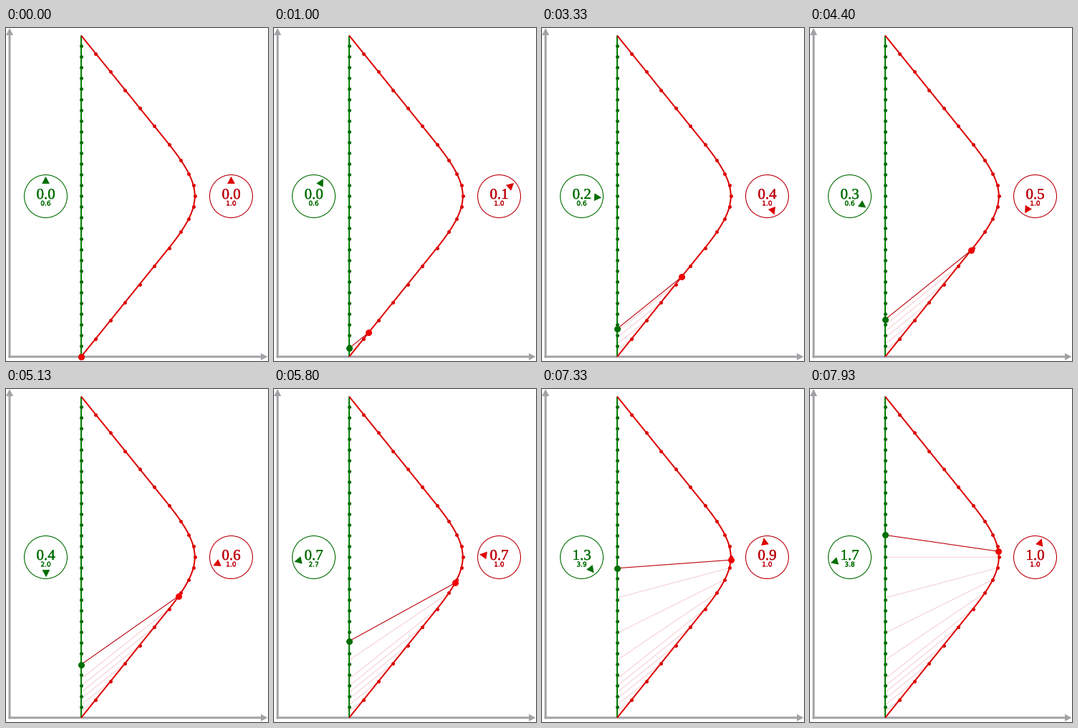
A matplotlib script for the animation above (8000 ms loop, 366 by 466 pixels).

```python
import numpy as np
import matplotlib.pyplot as plt
from matplotlib.animation import FuncAnimation
from matplotlib.patches import Circle, Polygon
from matplotlib.patheffects import withStroke

W, H, DPI = 366, 466, 64
PX = 72 / DPI                    # points per pixel
X0, Y0, UNIT = 105, 460, 150     # start event, pixels per unit of time
RAPIDITY, ACC, TURN = 1.116, 2.73, 1.0
COAST = TURN - RAPIDITY / ACC    # proper time before the engine starts
FRAMES, STEP = 80, 1 / 75

GRAY, GREEN, DARK_GREEN = "#a2a2a6", "#008000", "#006e00"
RED, DARK_RED, HOT_RED, PINK = "#dc0000", "#bc000a", "#f00000", "#f5ccd2"

X_MAX = COAST * np.sinh(RAPIDITY) + (np.cosh(RAPIDITY) - 1) / ACC
T_MID = COAST * np.cosh(RAPIDITY) + np.sinh(RAPIDITY) / ACC


def traveller(tau):
    """Position, time and rapidity at proper time tau."""
    d = tau - TURN
    a = np.clip(d, COAST - TURN, TURN - COAST)
    rest = d - a
    phi = -ACC * a
    x = X_MAX - (np.cosh(phi) - 1) / ACC + rest * np.sinh(phi)
    t = T_MID - np.sinh(phi) / ACC + rest * np.cosh(phi)
    return x, t, phi


def home_time(tau):
    """Time at home that is simultaneous for the traveller."""
    x, t, phi = traveller(tau)
    return t - np.tanh(phi) * x


def home_rate(tau):
    x, _, phi = traveller(tau)
    g = ACC if abs(tau - TURN) < TURN - COAST else 0
    return 1 / np.cosh(phi) + g * x / np.cosh(phi) ** 2


def to_px(x, t):
    return X0 + UNIT * x, Y0 - UNIT * t


def link(tau):
    """Pixel ends of the simultaneity line at tau."""
    x, t, _ = traveller(tau)
    return to_px(np.array([0, x]), np.array([home_time(tau), t]))


fig = plt.figure(figsize=(W / DPI, H / DPI), dpi=DPI, facecolor="white")
ax = fig.add_axes([0, 0, 1, 1])
ax.set(xlim=(0, W), ylim=(H, 0))
ax.axis("off")


def line(x, y, color, width, z):
    return ax.plot(x, y, color=color, lw=width * PX, zorder=z,
                   solid_capstyle="butt", snap=False)[0]


def dots(x, y, color, size, z):
    return ax.plot(x, y, "o", color=color, ms=size * PX, mew=0, zorder=z,
                   snap=False)[0]


class Dial:
    def __init__(self, cx, ink, hand):
        self.c = np.array([cx, 235.5])
        ax.add_patch(Circle(self.c, 30, fill=False, ec=ink, lw=1.1 * PX))
        self.hand = ax.add_patch(Polygon(np.zeros((3, 2)), fc=hand, lw=0))
        self.big = self.label(239, ink, "Liberation Serif", 21)
        self.small = self.label(248.4, ink, "DejaVu Sans", 9)

    def label(self, y, ink, family, size):
        bold = withStroke(linewidth=0.35 * PX, foreground=ink)
        return ax.text(self.c[0], y, "", color=ink, ha="center", zorder=5,
                       family=family, size=size * PX, path_effects=[bold])

    def show(self, time, rate):
        a = 2 * np.pi * time
        out = np.array([np.sin(a), -np.cos(a)])
        side = np.array([np.cos(a), np.sin(a)])
        base = self.c + 17.6 * out
        self.hand.set_xy([self.c + 27.8 * out, base + 5.4 * side,
                          base - 5.4 * side])
        self.big.set_text(f"{np.floor(time * 10 + 1e-6) / 10:.1f}")
        self.small.set_text(f"{rate:.1f}")


# axes
line([5, 5], [461.5, 8], GRAY, 3, 1)
line([3.5, 358], [460, 460], GRAY, 3, 1)
for tri in ([(5, 0), (0, 10), (10, 10)],
            [(365.5, 460), (356, 455), (356, 465)]):
    ax.add_patch(Polygon(tri, fc=GRAY, lw=0))

# world lines
line(*to_px(np.zeros(2), np.array([0, 2 * T_MID])), GREEN, 2, 3)
dots(*to_px(np.zeros(29), np.arange(1, 30) / 10), DARK_GREEN, 5, 3)
line(*to_px(*traveller(np.linspace(0, 2 * TURN, 241))[:2]), RED, 2, 4)
dots(*to_px(*traveller(np.arange(1, 20) / 10)[:2]), RED, 5, 4)

trail = [line(*link(k / 10), PINK, 1, 2) for k in range(1, 11)]
beam = line([], [], DARK_RED, 1.1, 5)
home = dots([], [], DARK_GREEN, 9, 6)
ship = dots([], [], HOT_RED, 9, 7)
home_dial = Dial(55.5, DARK_GREEN, DARK_GREEN)
ship_dial = Dial(314.5, DARK_RED, RED)


def update(n):
    tau = n * STEP
    xs, ys = link(tau)
    beam.set_data(xs, ys)
    home.set_data(xs[:1], ys[:1])
    ship.set_data(xs[1:], ys[1:])
    for k, ln in enumerate(trail, 1):
        ln.set_visible(tau >= k / 10 - 1e-9)
    home_dial.show(home_time(tau), home_rate(tau))
    ship_dial.show(tau, 1)
    return []


anim = FuncAnimation(fig, update, frames=FRAMES, interval=100,
                     init_func=lambda: update(0), repeat=True, repeat_delay=0)
plt.show()
```
